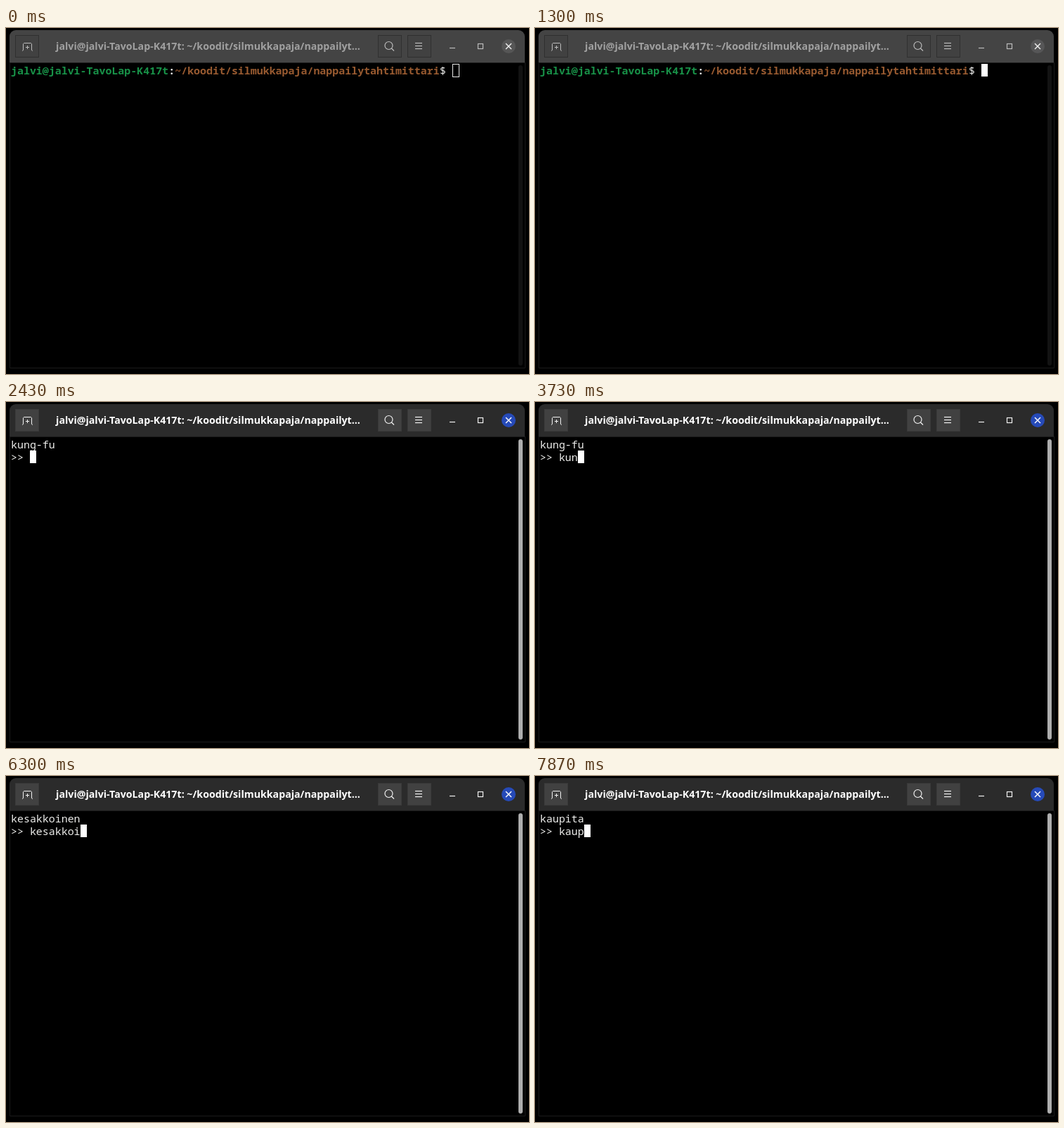
An HTML page with a canvas for the animation above (8000 ms loop, 744x492 px).

```html
<!DOCTYPE html>
<html lang="fi">
<head>
<meta charset="utf-8">
<title>Terminal</title>
<style>
html, body { margin: 0; width: 100%; height: 100%; overflow: hidden; background: #000; }
canvas { display: block; }
</style>
</head>
<body>
<canvas id="stage" width="744" height="492"></canvas>
<script>
const ctx = document.getElementById('stage').getContext('2d');

const LOOP = 8000;
const FOCUS = 1270;            // cursor turns solid
const FADE = [1300, 1530];     // title bar lights up
const CLEAR = 1930;            // command starts
const X0 = 7, CELL = 8.97, ROW = 18;
const MONO = '14.95px "Noto Sans Mono", "DejaVu Sans Mono", monospace';
const SANS = 'bold 14.2px "Noto Sans", "Open Sans", sans-serif';
const INK = '#eeeeec';

const USER = 'jalvi@jalvi-TavoLap-K417t';
const DIR = '~/koodit/silmukkapaja/';
const PATH = DIR + 'nappailytahtimittari';
const TITLE = USER + ': ' + DIR + 'nappailyt...';

// Each word: time shown, then the time of every key press.
const ROUNDS = [
  { word: 'kung-fu', at: 2000, keys: [3330, 3500, 3670, 3870, 4070, 4230, 4400] },
  { word: 'kesakkoinen', at: 4570,
    keys: [5170, 5270, 5500, 5730, 5900, 6030, 6130, 6270, 6400, 6500, 6630] },
  { word: 'kaupita', at: 6900, keys: [7470, 7570, 7730, 7870] }
];

const clamp = v => Math.max(0, Math.min(1, v));
const easeOut = v => 1 - (1 - v) ** 2;
const gray = v => [v, v, v];

function mix(a, b, k) {
  const c = a.map((v, i) => Math.round(v + (b[i] - v) * k));
  return `rgb(${c.join(',')})`;
}

function box(x, y, w, h, r, fill) {
  ctx.fillStyle = fill;
  ctx.beginPath();
  ctx.roundRect(x, y, w, h, r);
  ctx.fill();
}

function line(...pts) {
  ctx.beginPath();
  for (let i = 0; i < pts.length; i += 2) ctx.lineTo(pts[i], pts[i + 1]);
  ctx.stroke();
}

function text(str, col, row, color, weight = '') {
  ctx.font = weight + ' ' + MONO;
  ctx.textAlign = 'left';
  ctx.fillStyle = color;
  ctx.fillText(str, X0 + col * CELL, 66 + row * ROW);
}

function cursor(col, row, solid) {
  const x = Math.round(X0 + col * CELL), y = 51 + row * ROW;
  if (solid) {
    ctx.fillStyle = '#fff';
    ctx.fillRect(x, y, 9, 18);
  } else {
    ctx.strokeStyle = INK;
    ctx.lineWidth = 1;
    ctx.strokeRect(x + .5, y + .5, 9, 18);
  }
}

function icons(color) {
  ctx.strokeStyle = color;
  ctx.lineWidth = 1;
  // new tab
  line(23, 32.5, 24.5, 31.5, 24.5, 22.5, 25.5, 21.5, 35.5, 21.5, 36.5, 22.5, 36.5, 31.5, 38, 32.5);
  line(28, 27.5, 33, 27.5);
  line(30.5, 25, 30.5, 30);
  // search
  ctx.lineWidth = 1.2;
  ctx.beginPath();
  ctx.arc(544.5, 25, 5.5, 0, Math.PI * 2);
  ctx.stroke();
  line(548.5, 29, 552, 32.5);
  // menu
  for (const y of [21.5, 25.5, 29.5]) line(582, y, 592, y);
  // minimise, maximise
  line(631, 28.5, 639, 28.5);
  ctx.strokeRect(671.5, 22.5, 7, 7);
}

function header(k) {
  box(5, 3, 733, 47, [9, 9, 0, 0], mix(gray(68), gray(43), k));
  for (const x of [13, 529, 571]) {
    box(x, 10, 34, 32, 3, mix(gray(65), gray(65), k));
    ctx.strokeStyle = mix(gray(48), gray(58), k);
    ctx.lineWidth = 1;
    ctx.strokeRect(x + .5, 10.5, 33, 31);
  }
  ctx.fillStyle = '#1b1b1b';
  ctx.fillRect(5, 49, 733, 1);

  ctx.font = SANS;
  ctx.textAlign = 'center';
  ctx.fillStyle = mix(gray(160), gray(255), k);
  ctx.fillText(TITLE, 287.5, 31);

  icons(mix(gray(188), gray(242), k));
  box(705, 16, 20, 20, 10, mix(gray(86), [38, 74, 184], k));
  ctx.strokeStyle = mix(gray(238), gray(255), k);
  ctx.lineWidth = 1.5;
  line(711, 22, 719, 30);
  line(719, 22, 711, 30);
}

function prompt(t) {
  const end = USER.length + 1 + PATH.length;
  text(USER, 0, 0, '#189248', 'bold');
  text(':', USER.length, 0, INK, 'bold');
  text(PATH, USER.length + 1, 0, '#985a30', 'bold');
  text('$', end, 0, INK);
  cursor(end + 2, 0, t >= FOCUS);
}

function round(t) {
  const now = ROUNDS.filter(r => t >= r.at).pop();
  if (!now) return cursor(0, 0, true);
  const n = now.keys.filter(k => t >= k).length;
  text(now.word, 0, 0, INK);
  text('>> ' + now.word.slice(0, n), 0, 1, INK);
  cursor(3 + n, 1, true);
}

function draw(t) {
  const k = easeOut(clamp((t - FADE[0]) / (FADE[1] - FADE[0])));
  ctx.fillStyle = '#000';
  ctx.fillRect(0, 0, 744, 492);
  ctx.strokeStyle = '#1a1a1a';
  ctx.lineWidth = 1;
  line(5.5, 49, 5.5, 483.5, 738.5, 483.5, 738.5, 49);
  header(k);
  box(729, 53, 6, 427, 3, mix(gray(18), gray(174), k));
  if (t < CLEAR) prompt(t);
  else round(t);
}

function tick() {
  draw(performance.now() % LOOP);
  requestAnimationFrame(tick);
}
tick();
</script>
</body>
</html>
```
